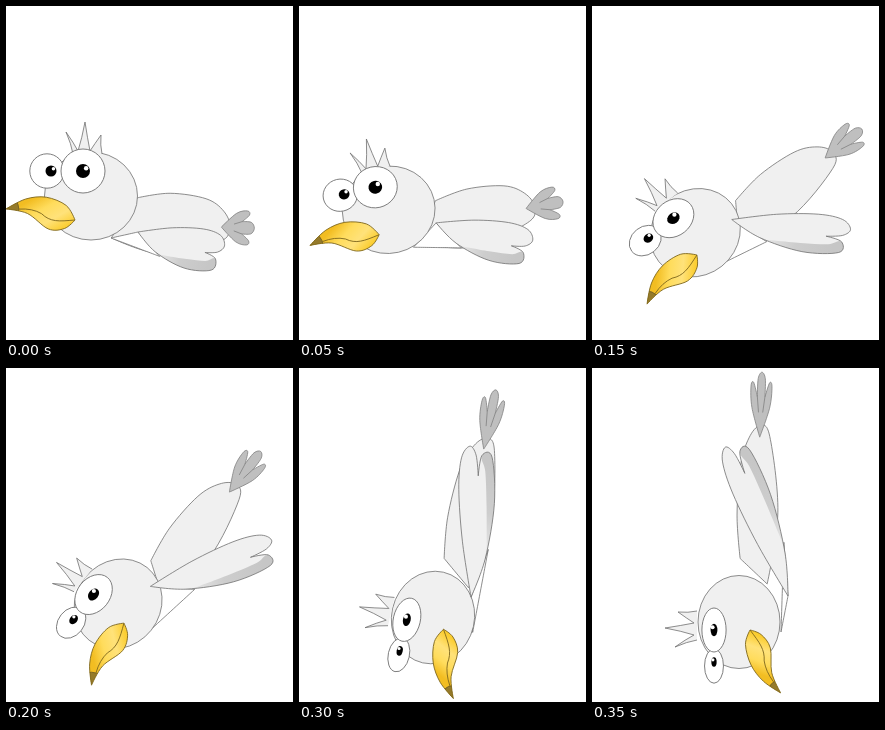
Animation of 287 by 334 pixels, one loop 700 ms. Source, as an HTML page with a canvas:

```html
<!DOCTYPE html>
<html lang="en">
<head>
<meta charset="utf-8">
<title>Diving bird</title>
<style>
html, body { margin: 0; width: 100%; height: 100%; overflow: hidden; background: #fff; }
canvas { display: block; width: 287px; height: 334px; }
</style>
</head>
<body>
<canvas id="stage"></canvas>
<script>
const W = 287, H = 334, LOOP = 700, STEP = 50, LAST = 7;
const LINE = '#707070', PALE = '#f0f0f0';
const canvas = document.getElementById('stage');
const ctx = canvas.getContext('2d');
const dpr = window.devicePixelRatio || 1;
canvas.width = W * dpr;
canvas.height = H * dpr;

const lerp = (a, b, k) => a + (b - a) * k;
const mix = (a, b, k) => a.map((v, i) => lerp(v, b[i], k));
const bezier = (a, b, c, k) => mix(mix(a, b, k), mix(b, c, k), k);
const rad = deg => deg * Math.PI / 180;

function smooth(k) {
  k = Math.max(0, Math.min(1, k));
  return k * k * (3 - 2 * k);
}

// Maps a part's own coordinates to the stage.
function frame([ox, oy], deg, sx = 1, sy = 1) {
  const c = Math.cos(rad(deg)), s = Math.sin(rad(deg));
  return (x, y) => [ox + x * sx * c - y * sy * s, oy + x * sx * s + y * sy * c];
}

// Closed smooth outline; the listed corners stay sharp.
function outline(pts, corners = []) {
  const n = pts.length, path = new Path2D();
  const handle = (i, dir) => {
    const p = pts[i], a = pts[(i + n - 1) % n], b = pts[(i + 1) % n];
    return corners.includes(i) ? p : p.map((v, k) => v + dir * (b[k] - a[k]) / 6);
  };
  path.moveTo(...pts[0]);
  for (let i = 0; i < n; i++) {
    const j = (i + 1) % n;
    path.bezierCurveTo(...handle(i, 1), ...handle(j, -1), ...pts[j]);
  }
  path.closePath();
  return path;
}

function oval([x, y], rx, ry = rx, deg = 0) {
  const path = new Path2D();
  path.ellipse(x, y, rx, ry, rad(deg), 0, Math.PI * 2);
  return path;
}

function stroke(path, line = LINE, width = 0.8) {
  ctx.strokeStyle = line;
  ctx.lineWidth = width;
  ctx.stroke(path);
}

function paint(path, fill, line, width) {
  ctx.fillStyle = fill;
  ctx.fill(path);
  stroke(path, line, width);
}

function clipped(path, drawInside) {
  ctx.save();
  ctx.clip(path);
  drawInside();
  ctx.restore();
}

function gradient(from, to, ...colors) {
  const g = ctx.createLinearGradient(...from, ...to);
  colors.forEach((c, i) => g.addColorStop(i / (colors.length - 1), c));
  return g;
}

function drawBody(at) {
  paint(outline([
    at(0.34, -9), at(0.57, -21), at(0.84, -24), at(0.99, -16), at(1.06, -2),
    at(1.01, 15), at(0.61, 40), at(0.22, 36)
  ], [0, 7]), PALE);
}

function drawTail(at) {
  const half = side => [
    at(0.62, 0.18 * side), at(0.84, 0.38 * side), at(0.78, 0.5 * side), at(0.45, 0.42 * side)
  ];
  paint(outline([
    at(0, 0), ...half(-1).reverse(), at(0.9, -0.17), at(1, 0), at(0.9, 0.17), ...half(1)
  ], [0, 4, 8]), '#bfbfbf', '#808080');
  for (const side of [-1, 1]) {
    const crease = new Path2D();
    crease.moveTo(...at(0.62, 0.18 * side));
    crease.lineTo(...at(0.38, 0.1 * side));
    stroke(crease, '#808080');
  }
}

function drawCrest(at) {
  const path = new Path2D();
  const pts = [
    at(-18, -42), at(-25, -64), at(-13, -45), at(-6, -74), at(-1, -45), at(10, -61), at(11, -42)
  ];
  path.moveTo(...pts[0]);
  for (let i = 1; i < pts.length; i++) {
    path.quadraticCurveTo(...mix(mix(pts[i - 1], pts[i], 0.5), at(-4, -44), 0.1), ...pts[i]);
  }
  paint(path, PALE);
}

function drawEye(center, pupil, r, size, flat, deg) {
  paint(oval(center, r, r * flat, deg), '#fff', LINE, 0.9);
  const at = frame(pupil, deg, size, size * flat);
  ctx.fillStyle = '#000';
  ctx.fill(oval(pupil, size, size * flat, deg));
  ctx.fillStyle = '#fff';
  ctx.fill(oval(at(0.45, -0.4), size * 0.32));
}

function drawBeak(at) {
  const tip = at(70, 0), corner = at(0, 0);
  const path = outline([
    tip, at(52, -13), at(32, -18), at(11, -13), corner, at(9, 10), at(25, 13), at(48, 1)
  ], [0, 4]);
  ctx.fillStyle = gradient(at(40, -18), at(15, 14), '#f2bd22', '#ffdc5c', '#ffe27a', '#fbcd30');
  ctx.fill(path);
  clipped(path, () => paint(oval(tip, 13), '#957a2a', '#6b5a22'));
  stroke(path, '#7d661c', 0.9);
  const mouth = new Path2D();
  mouth.moveTo(...corner);
  mouth.bezierCurveTo(...at(16, 4), ...at(24, 6), ...at(34, -1));
  mouth.quadraticCurveTo(...at(44, -5), ...at(57, -2));
  stroke(mouth, '#7d661c', 0.9);
}

function drawWing(at) {
  const path = outline([
    at(0, 0), at(0.45, -14), at(0.88, -22), at(1.14, -21), at(1.24, -12), at(1.17, -4),
    at(1, 0), at(1.17, 3), at(1.16, 15), at(0.78, 21), at(0.32, 14)
  ], [0, 6]);
  ctx.fillStyle = PALE;
  ctx.fill(path);
  clipped(path, () => {
    ctx.fillStyle = gradient(at(0.3, 14), at(1.1, 14), '#ebebeb', '#cdcdcd', '#c6c6c6');
    ctx.fill(outline([
      at(0.3, 16), at(0.8, 28), at(1.3, 20), at(1.17, 3), at(1.04, 8), at(0.75, 12)
    ], [0]));
  });
  stroke(path);
}

// p runs from 0 (level flight) to 1 (nose down).
function draw(p) {
  ctx.setTransform(dpr, 0, 0, dpr, 0, 0);
  ctx.fillStyle = '#fff';
  ctx.fillRect(0, 0, W, H);
  ctx.lineJoin = 'round';

  const turn = -90 * p;
  const center = bezier([85, 190], [99, 241], [147, 254], p);
  const head = frame(center, turn);

  const swing = p + 0.4 * p ** 3 * (1 - p);
  const reach = lerp(134, 186, p ** 1.4);
  const body = frame(center, 13.4 - 97 * swing, reach, lerp(1, 0.66, p));
  const tail = frame(body(1, 0), lerp(2, -88, swing), lerp(33, 65, p), lerp(34, 21, p));

  const root = head(...bezier([47, 36], [34, -17], [26, 49], p));
  const flap = 17 - 130 * smooth((p - 0.323) * 1.33);
  const wing = frame(root, flap, lerp(70, 130, p), lerp(1, 0.82, p));

  const beak = frame(head(lerp(-16, -8, p), lerp(24, 11, p)), 189 - 125 * p, 1, lerp(-1, -0.8, p));
  const flat = lerp(1, 0.55, p);

  drawBody(body);
  paint(outline([
    head(20 - 30 * p, 42), mix(head(20 - 30 * p, 42), wing(0.4, 17), 0.5), wing(0.4, 17), root
  ], [0, 2, 3]), '#fff');
  drawTail(tail);
  paint(oval(center, 46.5, lerp(44, 41, p), turn), PALE);
  drawCrest(head);
  drawEye(head(-44, -25), head(-40, -25), 17.2, lerp(5.5, 4.8, p), flat, turn);
  drawEye(head(-8, -25), head(-8, -25), 22, lerp(7, 6.2, p), flat, turn);
  drawBeak(beak);
  drawWing(wing);
}

const start = performance.now();
function tick() {
  const t = (performance.now() - start) % LOOP;
  draw(Math.min(LAST, Math.floor(t / STEP)) / LAST);
  requestAnimationFrame(tick);
}
tick();
</script>
</body>
</html>
```
